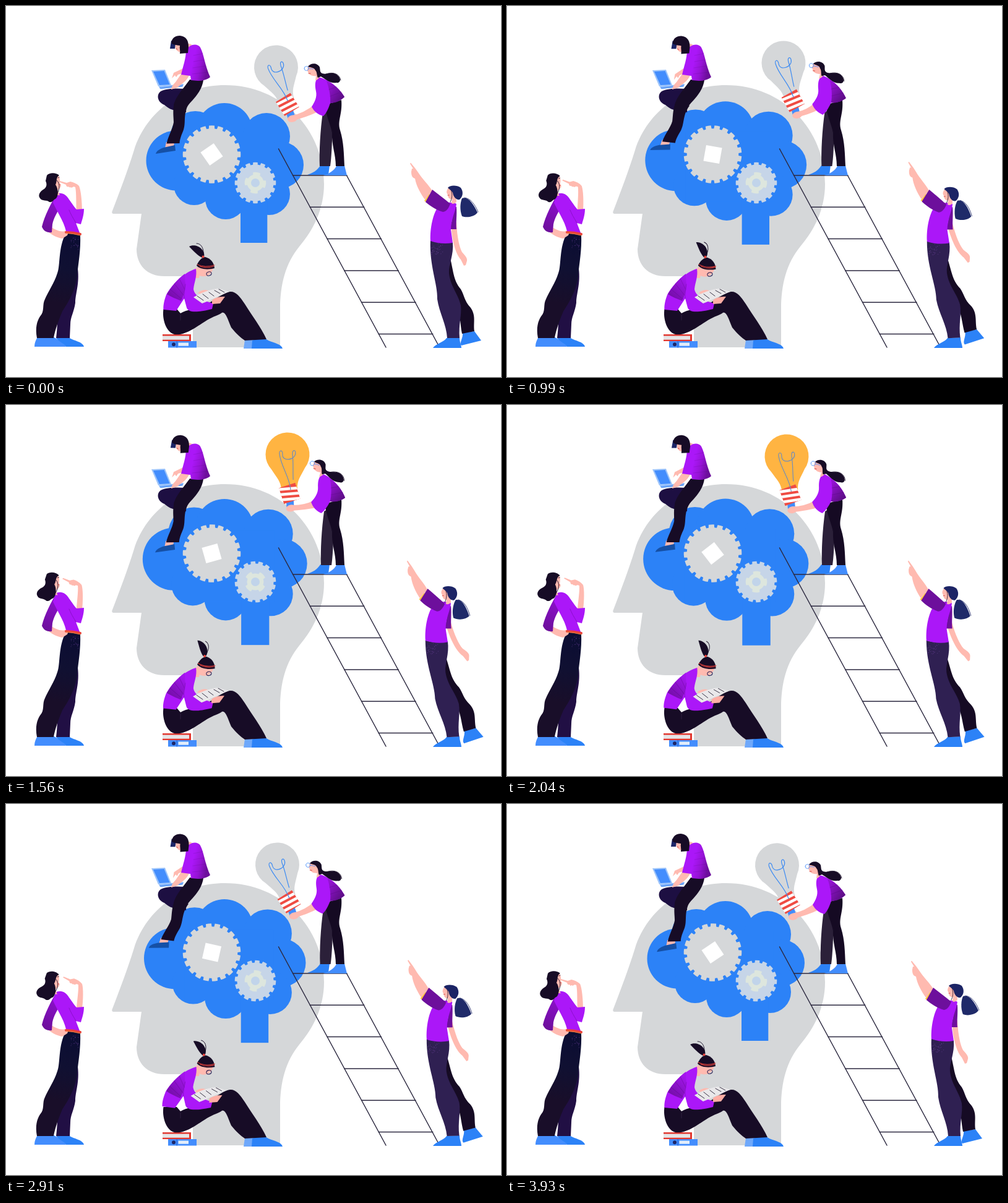
An HTML page with a canvas that plays this animation: 800 by 600 pixels, repeating every 3960 ms.

```html
<!DOCTYPE html>
<html lang="en">
<head>
<meta charset="utf-8">
<title>Thinking together</title>
<style>
html, body { margin: 0; width: 100%; height: 100%; overflow: hidden; background: #fff; }
canvas { display: block; width: 800px; height: 600px; }
</style>
</head>
<body>
<canvas id="stage"></canvas>
<script>
const LOOP = 3960, STEP = 30, TAU = Math.PI * 2;
const canvas = document.getElementById('stage');
const ratio = window.devicePixelRatio || 1;
canvas.width = 800 * ratio;
canvas.height = 600 * ratio;
const c = canvas.getContext('2d');

const SKIN = '#ffbab0', INK = '#170c26', PURPLE = '#ab17f8', PLUM = '#6d0f9c';
const BLUE = '#2c82f7', SKY = '#438dfd', GREY = '#d5d7d9', RED = '#e8423b';

// ---------- drawing helpers ----------
const paths = {};
const path = d => paths[d] || (paths[d] = new Path2D(d));
function fill(color, d) { c.fillStyle = color; c.fill(path(d)); }
function line(color, width, d) {
  c.strokeStyle = color;
  c.lineWidth = width;
  c.stroke(path(d));
}
function disc(color, x, y, r) {
  c.fillStyle = color;
  c.beginPath();
  c.arc(x, y, r, 0, TAU);
  c.fill();
}
function box(color, x, y, w, h) { c.fillStyle = color; c.fillRect(x, y, w, h); }
function turn(x, y, deg, draw, dx = 0, dy = 0) {
  c.save();
  c.translate(x + dx, y + dy);
  c.rotate(deg * Math.PI / 180);
  c.translate(-x, -y);
  draw();
  c.restore();
}
function blend(x0, y0, x1, y1, ...colors) {
  const g = c.createLinearGradient(x0, y0, x1, y1);
  colors.forEach((k, i) => g.addColorStop(i / (colors.length - 1), k));
  return g;
}
function mix(a, b, k) {
  return `rgb(${a.map((v, i) => Math.round(v + (b[i] - v) * k))})`;
}
function speckle(x, y, w, h, n, seed) {
  for (let i = 0; i < n; i++) {
    const a = Math.sin(i * 12.99 + seed) * 4375.5, b = Math.sin(i * 78.23 + seed) * 4375.5;
    disc('rgba(150,90,200,.55)', x + (a - Math.floor(a)) * w, y + (b - Math.floor(b)) * h, .5);
  }
}

// ---------- motion helpers ----------
// Smooth periodic curve through [time, value] keys.
function track(keys, period = LOOP) {
  const n = keys.length;
  const key = i => {
    const turns = Math.floor(i / n), k = keys[i - turns * n];
    return [k[0] + turns * period, k[1]];
  };
  const slope = i => {
    const a = key(i - 1), b = key(i + 1);
    return (b[1] - a[1]) / (b[0] - a[0]);
  };
  return t => {
    t %= period;
    let i = n - 1;
    while (keys[i][0] > t) i--;
    const [t0, v0] = key(i), [t1, v1] = key(i + 1);
    const d = t1 - t0, u = (t - t0) / d, u2 = u * u, u3 = u2 * u;
    return v0 * (2 * u3 - 3 * u2 + 1) + v1 * (3 * u2 - 2 * u3) +
      d * (slope(i) * (u3 - 2 * u2 + u) + slope(i + 1) * (u3 - u2));
  };
}
const breathe = t => .5 - .5 * Math.cos(TAU * t / LOOP);
const tap = track([[0, 0], [60, .2], [480, .88], [740, 1.03], [930, 1], [990, .95], [1560, .08], [1800, -.03]], 1980);
const sway = track([[0, 0], [480, .37], [990, .88], [1560, 1], [2040, 1], [2910, .75]]);
const pony = track([[0, 0], [480, .12], [990, .75], [1560, 1], [2040, 1], [2910, .55]]);
const page = track([[0, 0], [990, 0], [1560, -1], [2040, -2.5], [2910, -4.5]]);
const ponder = track([[0, 0], [480, .1], [990, .55], [1560, .85], [2040, 1], [2910, 1]]);
const lean = track([[0, 0], [480, 1.8], [990, 6.5], [1560, 9.5], [2040, 9.3], [2910, 2.8]]);
const bulbX = track([[0, 436.5], [480, 437], [990, 447], [1560, 455], [2040, 452], [2910, 438.5]]);
const bulbY = track([[0, 99], [480, 102], [990, 92], [1560, 80], [1700, 79.5], [2040, 83], [2910, 98], [3420, 96.5]]);
const bulbTilt = track([[0, 17], [480, 21], [990, 14], [1560, 3], [2040, 5.4], [2910, 17.6]]);
const ramp = (t, a, b) => Math.min(1, Math.max(0, (t - a) / (b - a)));
const glow = t => ramp(t, 1200, 1380) - ramp(t, 2500, 2680);

// ---------- scenery ----------
function head() {
  fill(GREY, 'M172 331C184 300 197 265 207 233C228 168 287 128 354 128C446 128 514 200 514 288C514 328 497 362 474 389C452 416 443 450 443 490V552H302V437H256C228 437 211 419 211 393L219 336H173Q170 335 172 331Z');
}

function brain(t) {
  const k = 1 + .05 * breathe(t);
  c.save();
  c.translate(353.5, 268);
  c.scale(k, k);
  c.translate(-353.5, -268);
  [[275, 250, 48.5], [306, 210, 40], [353, 202, 45], [421, 211, 38], [443, 257, 38],
    [425, 304, 34], [355, 312, 33], [304, 289, 33]].forEach(p => disc(BLUE, ...p));
  box(BLUE, 290, 205, 140, 110);
  box(BLUE, 379, 310, 43.3, 73);
  c.restore();
}

function cog(color, x, y, deg, teeth, inner, outer, share) {
  const pitch = TAU / teeth, half = pitch * share / 2, a0 = deg * Math.PI / 180;
  c.fillStyle = color;
  c.beginPath();
  for (let i = 0; i < teeth; i++) {
    const a = a0 + i * pitch;
    c.arc(x, y, outer, a - half * .92, a + half * .92);
    c.arc(x, y, inner, a + half * 1.08, a + pitch - half * 1.08);
  }
  c.closePath();
  c.fill();
}

function gears(t) {
  const big = -180 * t / LOOP, small = -360 * t / LOOP;
  cog(GREY, 332.5, 240, big, 20, 41.8, 46.8, .66);
  turn(332.5, 240, big + 55, () => box('#fff', 319.5, 227, 26, 26));
  cog('#c6d5e8', 403, 286, small, 16, 29.5, 33.3, .62);
  cog('#dde6de', 403, 286, small + 8, 4, 13.5, 17.3, .5);
  disc('#c1d4ea', 403, 286, 7);
}

function ladder() {
  line('#2c2940', 1.5, 'M440.5 231L614 552M550.5 274L699 549');
  for (let i = 0; i < 6; i++) {
    const x = 463.5 + i * 27.75, y = 274 + i * 51.3;
    c.beginPath();
    c.moveTo(x, y);
    c.lineTo(x + 87.5, y);
    c.stroke();
  }
}

// ---------- people ----------
function typist(t) {
  const k = tap(t), e = breathe(t);
  fill('#1d0f42', 'M250 138C243 143 244 155 256 160C263 166 268 168 274 169L291 172L292 134C276 133 260 133 250 138Z');
  turn(279, 160, 8.5 * k, () => {
    fill(SKIN, 'M259 220L272 220L271 227L257 230Z');
    fill('#1550a6', 'M273 225L274 234L242 239C243 234 250 230 259 228Z');
    fill(INK, 'M272 156C269 170 271 180 271 188C269 200 263 208 259.5 222.5L280.5 222C281 214 284 208 287 200C291 188 286 175 295 159Z');
  });
  fill(INK, 'M297 119L319 120C316 139 303 150 294 161C285 172 270 172 271 162C272 150 283 138 288 131Z');
  fill('#9cc4fb', 'M235 104L257 103L267 128L246 130Z');
  fill(SKY, 'M238 106L255.5 105L264.5 127L248 128Z');
  fill('#8bb9fa', 'M247 130L287 126L286 130L249 134Z');
  fill('#5f9cf5', 'M248 132L286 128L285 130.5L250 134Z');
  turn(286, 106, -9 * k, () => fill(SKIN, 'M286 101L285 109L278 111L275 115L273 112L268 117L271 108Z'));
  fill(SKIN, 'M283 110L296 112C292 122 283 126 277 132L267 135C267 131 270 127 274 123Z');
  fill(SKIN, 'M291 60L300 62L298 71L292 70Z');
  fill(blend(302, 90, 327, 96, PURPLE, '#9713d6', PLUM), 'M297 65C303 61 311 62 314 67C320 78 321 95 330 115C325 119 318 121 310 121L299 120L298 113L283 111C286 97 291 86 291 70Z');
  line('rgba(80,8,120,.18)', 1, 'M303 80L318 77M303 90L320 87M302 100L323 97M301 110L327 107');
  turn(281, 62, 1.5 * e, () => {
    fill(SKIN, 'M273 61L284 62L283 75C277 74 273 71 273 61Z');
    fill('#1d2668', 'M265 69L267 56L274 59L273 69Z');
    fill(INK, 'M267 60C268 52 273 48 281 48C292 49 295 57 295 66L294 76L281 77C282 72 280 68 281 64C275 63 270 63 267 60Z');
    line('#d2473f', 1, 'M275 69L277 70');
  }, 1.2 * e, .8 * e);
}

function bulb(t) {
  const k = glow(t), tilt = bulbTilt(t) * Math.PI / 180;
  c.save();
  c.translate(bulbX(t), bulbY(t));
  c.rotate(-tilt);
  c.fillStyle = mix([213, 215, 217], [255, 180, 66], k);
  c.fill(path('M-13 56C-13 43 -19 37 -27 23A35.5 35.5 0 1 1 27 23C19 37 13 43 13 56Z'));
  box(SKY, -6, 73, 12, 12);
  c.save();
  c.translate(0, 63);
  c.rotate(-.26);
  c.beginPath();
  c.rect(-14, -13.5, 28, 27);
  c.clip();
  box('#ef4c43', -14, -14, 28, 28);
  c.rotate(.26 - .6 * tilt);
  for (let i = 0; i < 3; i++) box('#fff', -25, i * 8.5 - 10, 50, 4.5);
  c.restore();
  line(mix([61, 139, 242], [112, 141, 184], k), 1.2, 'M2 57C1 35 -12 18 -13 -2C-13 -8 -8 -8 -8 -2C-9 6 -4 8 1 8C8 8 13 3 13 -2C13 -8 8 -7 8 0C9 12 7 28 7 41');
  c.restore();
}

function climber(t) {
  const a = lean(t), r = a * Math.PI / 180, b = bulbTilt(t) * Math.PI / 180;
  const hx = bulbX(t) + 87 * Math.sin(b), hy = bulbY(t) + 87 * Math.cos(b);
  const sx = 530 - 28 * Math.cos(r) - 9 * Math.sin(r), sy = 155 - 28 * Math.sin(r) + 9 * Math.cos(r);

  fill(BLUE, 'M487 273C496 270 503 266 508 258L523 258L521 273Z');
  fill(SKY, 'M513 274C523 271 530 266 534 259L547 258L551 274Z');
  c.save();
  c.translate(a * .22, 0);
  fill('#2b2039', 'M512 172C508 200 506 235 507 259L524 259C527 240 527 205 530 160Z');
  c.restore();
  fill('#150a23', 'M515 160L542 152C544 176 535 185 540 201C546 220 546 240 547 259L533 259C533 240 526 225 527 205C524 190 518 180 515 160Z');

  c.fillStyle = SKIN;
  c.beginPath();
  c.moveTo(sx - 3, sy - 5);
  c.quadraticCurveTo((hx + sx) / 2, (hy + sy) / 2, hx, hy - 5);
  c.lineTo(hx - 2, hy + 4);
  c.quadraticCurveTo((hx + sx) / 2 + 4, (hy + sy) / 2 + 7, sx + 4, sy + 6);
  c.fill();
  c.beginPath();
  c.ellipse(hx + 1, hy, 8, 5.5, -.2, 0, TAU);
  c.fill();

  turn(530, 155, a, () => {
    fill(PURPLE, 'M505 115C520 118 537 130 547 147C541 153 533 156 524 157C521 166 518 173 513 178C505 176 498 171 494 163C499 155 503 147 501 138C499 128 499 120 505 115Z');
    fill(blend(519, 130, 546, 148, '#9413d2', '#5a0d82'), 'M518 121C532 127 541 137 547 147C541 153 533 157 524 157C525 145 522 133 518 121Z');
    line('rgba(80,8,120,.3)', 1, 'M522 135L534 131M524 146L542 139');
    fill(SKIN, 'M488 98L503 98L506 116C503 120 500 121 500 120L501 113C494 114 489 111 487 104Z');
    fill(INK, 'M488 98C492 92 503 91 507 99C508 104 507 107 511 109C520 112 528 104 537 113C543 120 539 125 534 124C524 126 516 118 509 114L504 116C502 112 503 107 500 104C498 99 493 100 488 98Z');
    line(INK, .8, 'M517 110C528 106 539 109 541 120');
    line(SKY, .8, 'M482 101a3.5 3.5 0 1 0 7 0a3.5 3.5 0 1 0 -7 0M489 101L497 102');
    line('#d2473f', 1, 'M489 109L492 109');
  });
}

function books() {
  box('#e2372f', 253, 531, 46, 11);
  box('#e6e4e6', 253, 533.5, 43, 6.2);
  box(SKY, 262, 542, 46, 10.5);
  disc('#1d2668', 271, 547.2, 3);
  box('#2c6ee0', 275.5, 542, 1.5, 10.5);
  box('#e3eefb', 278.5, 544.5, 16.5, 5.2);
}

function reader(t) {
  const k = pony(t), p = page(t);
  books();
  fill('#6ea8fb', 'M386 540L401 539L398 554H384Z');
  fill(BLUE, 'M398 541C408 537 420 537 424 541C434 545 445 547 447 554H397Z');
  fill(INK, 'M254.5 490C252 505 258 527 272 531C290 534 310 517 325 508C335 502 344 500 349 496C355 494 358 506 364 520C372 530 380 537 386 541L421 539C412 519 397 500 386 482C378 470 372 462 363 462C350 463 332 480 318 486C305 490 292 491 282 497L276 490Z');
  line('#3a2d4d', .7, 'M282 499V508');
  fill(SKIN, 'M305 424L314 428L312 440L304 440Z');

  turn(312, 432, 5 * k, () => {
    fill(SKIN, 'M308 422C306 430 309 436 316 437C326 439 334 432 335 422Z');
    fill(INK, 'M308 420C311 412 317 406 322 406C330 408 336 414 337 424C326 427 314 426 308 420Z');
    line(RED, 1, 'M309 418Q322 424 337 419M313 421Q325 425 336 421');
    line('#2d2457', 1.1, 'M324 434a4 3 -20 1 0 8 -2a4 3 -20 1 0 -8 2');
    turn(319, 406, 24 * k, () => {
      fill(INK, 'M317 407C309 403 304 397 296 389C301 386 311 387 316 393C320 397 321 402 320 406Z');
      line(INK, .9, 'M308 384C315 384 320 391 319 403');
      disc(RED, 318.5, 405.5, 2);
    });
  });

  turn(306, 440, -p * .5, () => {
    fill(PURPLE, 'M307 425C290 430 270 447 259 467C255 478 254 485 254.5 491L275 493L288 473L292 488C295 495 305 497 333 490L335 481C320 477 305 470 303 458C304 447 309 438 307 425Z');
    fill(blend(288, 442, 262, 470, '#a315ec', '#720ea5'), 'M289 433C278 441 267 454 260 466C266 470 276 474 283 477C286 470 289 462 290 453Z');
    line('rgba(80,8,120,.3)', 1, 'M280 441L289 459M272 449L287 468M265 458L284 474');
    line('#8610c4', .9, 'M288 473C287 465 289 458 290 450');
  });
  c.save();
  c.translate(p, -p * .2);
  fill(SKIN, 'M310 464C317 458 326 458 331 463L320 470Z');
  fill('#e9e8ea', 'M303 471C315 464 330 458 343 457L361 462C348 467 330 476 317 481Z');
  line('#3a3446', 1, 'M309 469L319 476M318 466L327 473M328 463L336 469M337 460L346 465M344 458L353 463');
  fill('#ffaea4', 'M333 476C338 471 346 470 354 470L346 481L333 482Z');
  c.restore();
}

function thinker(t) {
  const k = ponder(t);
  fill(SKY, 'M50 537L78 536C85 541 95 544 97 551H46C46 545 48 541 50 537Z');
  fill(BLUE, 'M81 537H103C111 542 124 543 126 551H97C95 546 85 543 81 537Z');
  fill('#210f44', 'M92 430L116 425C119 450 112 465 112 480C110 495 104 503 104 515L103 537H81C84 515 82 500 88 480Z');
  fill(blend(96, 368, 70, 537, '#0b0d33', '#101032', '#190e29', '#190e29'), 'M97 367L120 370C121 395 117 415 115 435C113 460 100 480 91 494C85 508 79 525 77 537H50C47 520 50 510 55 502C63 494 58 483 63 474C68 462 78 448 83 432C88 420 84 390 97 367Z');
  speckle(105, 374, 13, 20, 24, 2);
  fill(SKIN, 'M72 357C80 362 88 366 95 364L103 361L99 371L91 376C83 375 74 370 69 366Z');
  fill(blend(82, 320, 62, 362, '#8a10c8', '#6d0f9c'), 'M82 304C73 318 62 340 58 357C61 365 68 367 74 366L75 353C77 343 83 333 88 325Z');
  turn(121, 332, 7 * k, () =>
    fill(SKIN, 'M114 335L123 335C123 315 121 298 118 291C114 287 109 285 104 284L98 286L87 283L86 284.5L97 289C97 292 100 293 101 292C103 295 105 292 106 294C109 292 110 292 112 293C114 303 113 318 114 335Z'));
  fill(PURPLE, 'M80 305C88 300 97 304 102 313C107 320 111 326 114 329L126 328C126 338 123 346 121 353L113 351L119.5 368L97 364C93 347 82 332 76 318Z');
  line('#8610c4', .9, 'M102 330C106 340 110 345 113 351');
  line(RED, 4, 'M97 366Q108 366 120 369');
  line('#f0a03c', .8, 'M97 367Q108 368 120 371');
  turn(80, 282, 7 * k, () => {
    fill(SKIN, 'M78 272C86 271 88 279 87 286L89 291C87 296 84 297 83 298L87 306L78 306L74 290Z');
    fill(INK, 'M66 274C70 269 81 269 86 274C80 277 83 284 80 289C85 296 85 308 80 312C76 313 76 318 70 317C66 313 58 316 55 311C51 306 55 300 60 297C67 293 66 287 64 283Z');
    line(INK, .9, 'M82 282C89 288 86 300 80 308');
    line(INK, .8, 'M84 278L86 277');
    line('#d2473f', .9, 'M86 289L88 289');
  }, -1.3 * k, 1.2 * k);
}

function pointer(t) {
  const s = sway(t);
  fill(BLUE, 'M712 537L733 536C733 543 736 548 736 553H690C695 546 707 544 712 537Z');
  turn(716, 548, -2.8 * s, () => {
    turn(718, 410, -1.8 * s, () => {
      fill(BLUE, 'M738 529L757 526L768 541L736 549C732 545 739 537 738 529Z');
      fill('#160b24', 'M716 400C724 430 722 442 735 458C741 468 740 476 751 488C760 501 755 512 757 526L737 530C734 515 735 505 730 490C720 470 708 440 716 400Z');
    });
    turn(723, 350, -10 * s, () =>
      fill(SKIN, 'M719 350L728 350C729 375 733 390 737 398C741 403 746 407 745 412L743 419L740 420L735 410C728 402 721 385 719 350Z'));
    fill('#2f2052', 'M686 379C697 383 710 384 722 382C724 403 715 418 716 432C718 453 731 466 735 484C737 500 731 515 733 537H713C712 515 700 496 697 474C698 450 684 420 686 379Z');
    speckle(687, 384, 19, 18, 34, 5);
    turn(704, 382, 2 * s, () => {
      fill(PLUM, 'M720 322C724 338 720 350 717 361L728 361C727 350 729 338 728 325Z');
      fill(PURPLE, 'M699 324C706 317 722 316 728 320C727 331 719 345 719 362L722 383C710 385 697 384 686 380C685 360 690 335 699 324Z');
      turn(705, 322, 4 * s, () => {
        fill(SKIN, 'M689 299C683 289 673 280 666 269L661 262L654 253.5L653 255L658 263L656 263L655 268C655 275 657 278 661 279C663 291 670 303 677 313Z');
        fill('#ffc63c', 'M676 315L684 304L687 308L680 318Z');
        fill(PLUM, 'M689 297C698 304 709 312 718 320C715 328 711 333 706 333C696 330 686 324 678 317Z');
      });
      turn(724, 316, 2 * s, () => {
        fill(SKIN, 'M715 294C712 298 711 302 714 305C714 311 718 313 721 312L720 319C723 321 726 319 728 317L727 296Z');
        line(INK, .8, 'M719 297C722 304 721 311 718 317');
        fill('#1c2465', 'M714 294C717 290 728 289 735 294C740 301 738 309 733 313C728 314 723 309 722 302C720 298 717 297 714 294Z');
        line('#d2473f', .9, 'M714 306L716 306');
        turn(736, 312, 6 * s, () => {
          fill('#1f2a69', 'M737 311C746 307 755 319 762 334C757 341 744 343 737 340C733 330 734 318 737 311Z');
          line('#1c2465', .8, 'M741 310C751 311 758 321 763 333');
        }, -1.5 * s, 1.5 * s);
      }, 0, 2 * s);
    });
  });
}

// ---------- loop ----------
function draw(t) {
  c.setTransform(ratio, 0, 0, ratio, 0, 0);
  box('#fff', 0, 0, 800, 600);
  c.lineCap = 'round';
  [head, brain, gears, typist, ladder, bulb, climber, reader, thinker, pointer].forEach(part => part(t));
}
function tick() {
  draw(Math.floor(performance.now() % LOOP / STEP) * STEP);
  requestAnimationFrame(tick);
}
tick();
</script>
</body>
</html>
```
